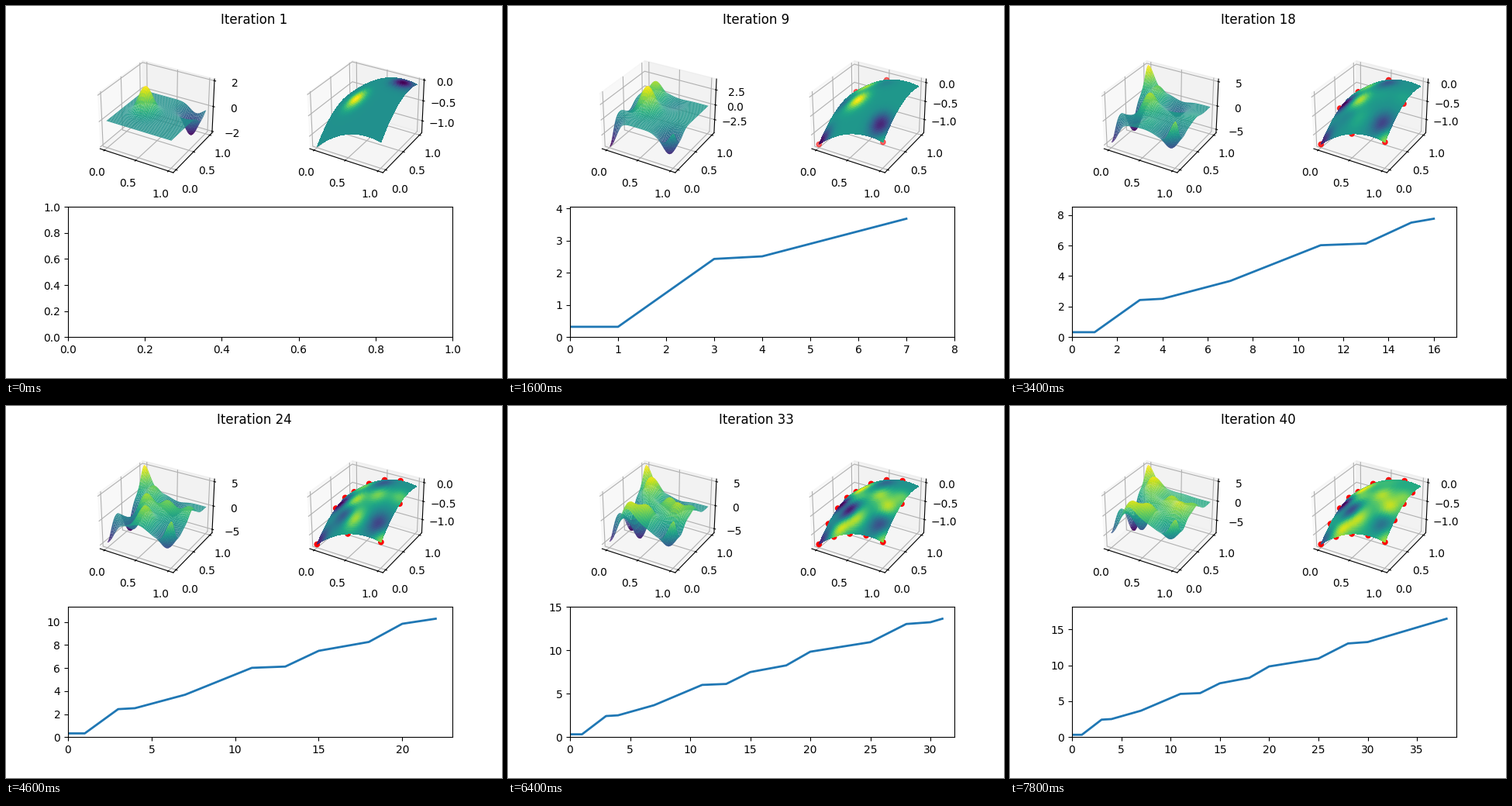
A matplotlib script for the animation above (8 s loop, 640 px wide and 480 px high).

```python
import numpy as np
import matplotlib.pyplot as plt
from matplotlib.animation import FuncAnimation

STEPS = 40
SIGMA = 0.1
GROW = 8  # steps a bump needs to reach its full height

# Bumps of the field: first step, x, y, full height
BUMPS = [
    (-4, .35, .45, 4.1), (-4, .85, .85, -4.1), (0, .85, .85, 4.1),
    (0, 0, 0, -4.6), (0, .88, .13, -4), (0, .27, .8, 3),
    (5, 1, 0, 4.5), (6, .05, .52, -5.6), (6, .57, .82, -2.5),
    (9, 0, 1, 5.3),
    (15, .5, .17, 4), (15, .3, .25, -3), (15, .95, .58, 2.5),
    (16, .65, .52, 3.5),
    (24, .3, .08, 4.8), (24, .33, .36, -5), (24, .85, .36, 4),
    (24, .2, .68, 3.5),
    (31, .05, .52, -2.8), (31, .57, .82, 3.5),
]

# Turning points of the running total: step, value
KNOTS = [
    (0, .32), (1, .32), (3, 2.43), (4, 2.51), (7, 3.68), (11, 6.02),
    (13, 6.13), (15, 7.5), (18, 8.27), (20, 9.85), (25, 10.95),
    (28, 13.05), (30, 13.25), (38, 16.5),
]
total = np.interp(np.arange(STEPS), *zip(*KNOTS))

grid = np.linspace(0, 1, 50)
X, Y = np.meshgrid(grid, grid)


def dome(x, y):
    return -(x - .8) ** 2 - (y - .8) ** 2


def field(step):
    z = np.zeros_like(X)
    for start, x, y, height in BUMPS:
        grown = np.clip((step - start) / GROW, 0, 1)
        dist2 = (X - x) ** 2 + (Y - y) ** 2
        z += height * grown * np.exp(-dist2 / (2 * SIGMA ** 2))
    return z


def coarseness(quarter):
    """Corners come first, then edge middles, then quarter points."""
    return 0 if quarter % 4 == 0 else 1 if quarter % 2 == 0 else 2


# Walk along the edge of the square, measured both ways from (0, 0)
walk = np.array(sorted(range(-7, 8), key=coarseness)) / 4
main, side = np.clip(np.abs(walk), 0, 1), np.clip(np.abs(walk) - 1, 0, 1)
dot_x = np.where(walk > 0, main, side)
dot_y = np.where(walk > 0, side, main)

fig = plt.figure(figsize=(6.4, 4.8), dpi=100)
ax_field = fig.add_subplot(2, 2, 1, projection="3d")
ax_dome = fig.add_subplot(2, 2, 2, projection="3d", computed_zorder=False)
ax_line = fig.add_subplot(2, 1, 2)
title = fig.suptitle("", y=.982)


def draw_dots(step):
    n = int(np.ceil(.4 * step))
    x, y = dot_x[:n], dot_y[:n]
    ax_dome.scatter(x, y, dome(x, y), color="red", zorder=1,
                    alpha=min(1, .3 + step / 32))


def update(step):
    for ax in (ax_field, ax_dome, ax_line):
        ax.clear()
    title.set_text(f"Iteration {step + 1}")

    z = field(step)
    ax_field.plot_surface(X, Y, z, cmap="viridis")

    shade = (z - z.min()) / (z.max() - z.min())
    ax_dome.plot_surface(X, Y, dome(X, Y), facecolors=plt.cm.viridis(shade),
                         linewidth=0, antialiased=False, shade=False,
                         zorder=2)
    if step:
        draw_dots(step)
        ax_line.plot(total[:step], lw=2)
        ax_line.set_xlim(0, step)
        ax_line.set_ylim(0, 1.1 * total[step - 1])
    return []


anim = FuncAnimation(fig, update, frames=STEPS, interval=200, repeat=True)
plt.show()
```
